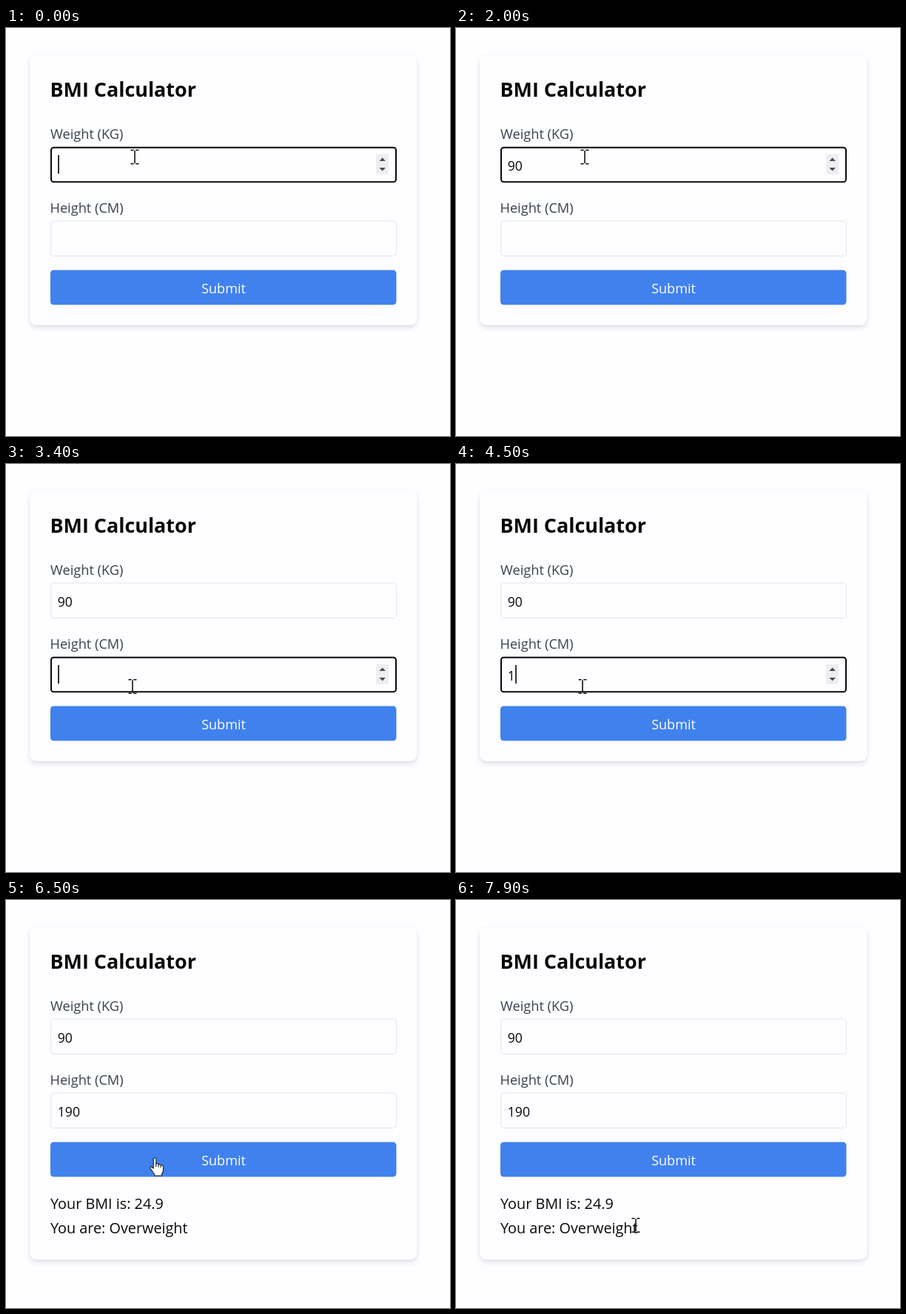
Animation, 600 px wide and 552 px high, one loop 8000 ms. Source, as an HTML page:

```html
<!DOCTYPE html>
<html lang="en">
<head>
<meta charset="utf-8">
<title>BMI Calculator</title>
<style>
  html, body { margin: 0; width: 100%; height: 100%; overflow: hidden; background: #fefdff; }
  svg { display: block; }
  text { font-family: "Open Sans", "Noto Sans", sans-serif; font-size: 18.2px; fill: #080808; }
  .title { font-size: 26.9px; font-weight: 700; }
  .label { fill: #3a4250; }
  .value { font-size: 17.6px; }
  .submit { font-size: 18px; fill: #fff; text-anchor: middle; }
  .result text { font-size: 19.8px; }
  .card { fill: #fefdff; filter: drop-shadow(0 4px 3.5px rgba(0,0,0,.09)) drop-shadow(0 1px 2px rgba(0,0,0,.06)); }
  .border { fill: none; stroke: #e5e6eb; }
  .ring { fill: none; stroke: #0a0a0c; stroke-width: 2; }
  .outlined { fill: #fff; stroke: #1a1a1a; stroke-width: 1.1; stroke-linejoin: round; }
</style>
</head>
<body>
<svg width="600" height="552" viewBox="0 0 600 552">
  <rect class="card" id="card" x="32" y="36" width="523.5" height="366" rx="9"/>
  <text class="title" x="59.5" y="93">BMI Calculator</text>
  <text class="label" x="60" y="150">Weight (KG)</text>
  <text class="label" x="59.5" y="250">Height (CM)</text>

  <defs>
    <g id="spinner">
      <rect x="500" y="10" width="17" height="27.5" fill="#efedf0"/>
      <path d="M504.5 19.5L508.7 15L512.9 19.5ZM504.5 28.5L508.7 33L512.9 28.5Z" fill="#4a494c"/>
    </g>
    <g id="field">
      <rect class="border" x="60.5" y=".5" width="467" height="47.5" rx="4"/>
    </g>
  </defs>
  <g id="weight" transform="translate(0 160.5)"></g>
  <g id="height" transform="translate(0 260.5)"></g>

  <rect x="60" y="327.5" width="467.5" height="47" rx="4.5" fill="#4081ee"/>
  <text class="submit" x="294" y="358.5">Submit</text>

  <g class="result" id="result">
    <text x="60" y="418">Your BMI is: 24.9</text>
    <text x="60" y="450.5">You are: Overweight</text>
  </g>

  <g id="mouse">
    <path id="beam" d="M-5.5 -9.3H-1.3M1.3 -9.3H5.5M0 -8.6V8.6M-5.5 9.3H-1.3M1.3 9.3H5.5" fill="none" stroke="#111" stroke-width="1.6"/>
    <path id="arrow" class="outlined" d="M0 0V17L4 13.3L6.6 19.2L9.2 18L6.7 12.3H12Z"/>
    <g id="hand" class="outlined">
      <path d="M-1.8 14V1.6Q-1.8 0 0 0T1.8 1.6V8Q4.6 6.6 5 9Q7.8 8 8.2 10Q11.4 9 11.5 12V17Q11.5 20 9.5 21.5V24H0Q0 22 -2.5 19L-6 14Q-7 11.5 -4.5 12Z"/>
      <path d="M1.8 8V12M5 9V12.5M8.2 10V13" fill="none"/>
    </g>
  </g>
</svg>
<script>
const LOOP = 8000, STEP = 100;
const HEIGHT_FOCUS = 3400, BLUR = 6300, RESULT = 6400;
const byId = id => document.getElementById(id);
const show = (el, on) => { el.style.display = on ? "" : "none"; };

// [time, typed text]
const weightKeys = [[-200, ""], [600, "9"], [1500, "90"]];
const heightKeys = [[HEIGHT_FOCUS, ""], [4300, "1"], [4700, "19"], [5100, "190"]];

// [time, x, y] of the pointer's hot spot
const path = [
  [0, 174, 174.5], [2300, 174, 174.5], [2800, 159, 264], [3200, 171, 301],
  [5200, 171, 301], [5700, 201, 349], [6500, 201, 349], [7000, 215, 366],
  [7300, 215, 366], [7900, 243, 440], [LOOP, 243, 440]
];

function makeField(id) {
  const g = byId(id);
  g.innerHTML = `<use href="#field"/>
    <rect class="ring" x="61" y="1.2" width="466" height="46.6" rx="3.5"/>
    <use class="spin" href="#spinner"/>
    <text class="value" x="69.8" y="32"></text>
    <rect class="caret" y="11.5" width="1.6" height="25"/>`;
  const [ring, spin, value, caret] =
    [".ring", ".spin", ".value", ".caret"].map(s => g.querySelector(s));
  return (t, keys, focused, hovered) => {
    const [since, text] = keys.filter(k => k[0] <= t).pop() || [0, ""];
    value.textContent = text;
    caret.setAttribute("x", 70.2 + 10 * text.length);
    show(ring, focused);
    show(spin, focused || hovered);
    show(caret, focused && (t - since) % 1000 < 500);
  };
}

const drawWeight = makeField("weight"), drawHeight = makeField("height");

function pointerAt(t) {
  const i = path.findIndex(p => p[0] > t);
  const [t0, x0, y0] = path[i - 1], [t1, x1, y1] = path[i];
  const k = (t - t0) / (t1 - t0);
  return [x0 + (x1 - x0) * k, y0 + (y1 - y0) * k];
}

function draw(t) {
  const [x, y] = pointerAt(t);
  const within = (top, bottom) => y >= top && y <= bottom;
  const onWeight = within(161, 209), onHeight = within(261, 309);
  const onButton = within(327, 375), onText = y > 398;

  drawWeight(t, weightKeys, t < HEIGHT_FOCUS, onWeight);
  drawHeight(t, heightKeys, t >= HEIGHT_FOCUS && t < BLUR, onHeight);
  show(byId("result"), t >= RESULT);
  byId("card").setAttribute("height", t >= RESULT ? 450.5 : 366);

  const beam = onWeight || onHeight || onText;
  show(byId("beam"), beam);
  show(byId("hand"), onButton);
  show(byId("arrow"), !beam && !onButton);
  byId("mouse").setAttribute("transform", `translate(${x} ${y})`);
}

const start = performance.now();
function tick() {
  const t = (performance.now() - start) % LOOP;
  draw(Math.floor(t / STEP) * STEP);
  requestAnimationFrame(tick);
}
tick();
</script>
</body>
</html>
```
